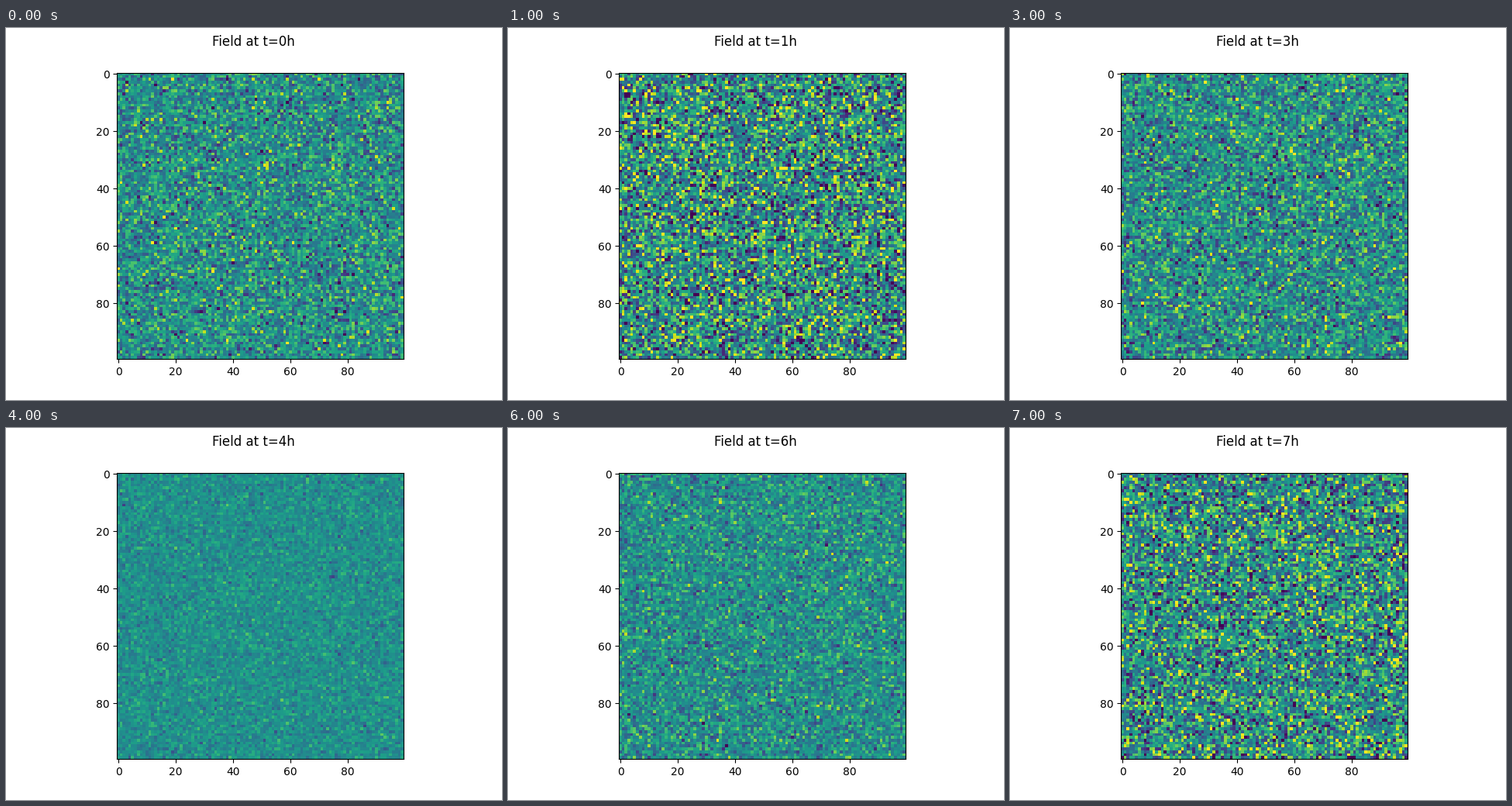
Animation of 640x480 px, one loop 8000 ms. Source, as a matplotlib script:

```python
import numpy as np
import matplotlib.pyplot as plt
from matplotlib.animation import FuncAnimation

SIZE = 100
HOURS = 8


def field(hour):
    """Gaussian noise whose spread swings with the hour."""
    rng = np.random.default_rng(hour)
    spread = 1 + 0.7 * np.sin(hour)
    return spread * rng.standard_normal((SIZE, SIZE))


fig, ax = plt.subplots(figsize=(6.4, 4.8), dpi=100)
image = ax.imshow(field(0), cmap="viridis", vmin=-3, vmax=3)
title = fig.suptitle("Field at t=0h", x=0.4985, y=0.982)


def update(hour):
    image.set_data(field(hour))
    title.set_text(f"Field at t={hour}h")
    return image, title


anim = FuncAnimation(fig, update, frames=HOURS, interval=1000,
                     repeat=True, repeat_delay=0)
plt.show()
```
